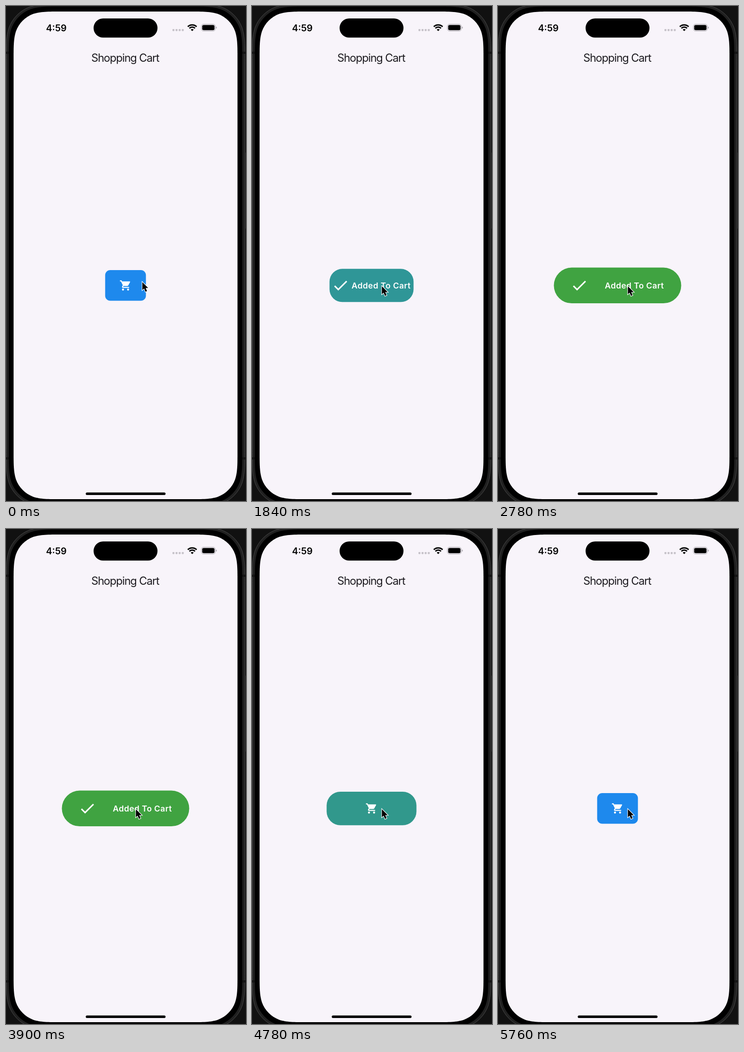
Recreate the animation shown at these times as an HTML page. Size 522x1074 px, loop 5.78 s.

```html
<!DOCTYPE html>
<html lang="en">
<head>
<meta charset="utf-8">
<title>Shopping Cart</title>
<style>
  html, body { margin: 0; width: 100%; height: 100%; overflow: hidden; background: #111; }
  svg { display: block; width: 522px; height: 1074px; }
  text { font-family: Inter, "Open Sans", sans-serif; font-optical-sizing: none; }
  .clock { font-size: 20px; font-weight: 600; }
  .title { font-size: 23.8px; letter-spacing: -1.1px; fill: #1d1b20; text-anchor: middle; }
  .added { font-size: 17.7px; font-weight: 600; letter-spacing: .45px; fill: #fff; }
  .warning { font-size: 8.3px; font-weight: 800; letter-spacing: .3px; fill: #7c0606; text-anchor: middle; }
</style>
</head>
<body>
<svg viewBox="0 0 522 1074">
  <defs>
    <linearGradient id="hazard" gradientUnits="userSpaceOnUse" x1="0" y1="0" x2="11" y2="11" spreadMethod="repeat">
      <stop offset=".25" stop-color="#000" stop-opacity=".75"/>
      <stop offset=".25" stop-color="#ff0" stop-opacity=".75"/>
      <stop offset=".75" stop-color="#ff0" stop-opacity=".75"/>
      <stop offset=".75" stop-color="#000" stop-opacity=".75"/>
    </linearGradient>
  </defs>

  <!-- phone -->
  <rect width="522" height="1074" fill="#111"/>
  <rect x="521" y="318" width="1" height="165" fill="#2e2e2e"/>
  <path id="frame" fill="#202020" stroke="#4a4a4a"/>
  <path d="M0 99h6v5H0zM514 99h6v5h-6zM0 979h6v5H0zM514 979h6v5h-6z" fill="#141414"/>
  <path id="bezel"/>
  <path id="screen" fill="#f8f4fa"/>

  <!-- status bar -->
  <text class="clock" x="87" y="54.5">4:59</text>
  <rect x="190.5" y="27" width="139" height="41.5" rx="20.7"/>
  <g id="dots" fill="#c6c2c9"></g>
  <path d="M395.4 44.9A13.6 13.6 0 0 1 414.6 44.9M398.9 48.4A8.6 8.6 0 0 1 411.1 48.4"
    fill="none" stroke="#000" stroke-width="3"/>
  <path d="M405 54.5l-3.2-3.2a4.5 4.5 0 0 1 6.4 0z"/>
  <rect x="424.9" y="39.4" width="30.4" height="15" rx="4.8" fill="none" stroke="#a5a2a8"/>
  <rect x="426.7" y="41.2" width="26.8" height="11.4" rx="3.3"/>
  <path d="M456.7 44.6q1.9.7 1.9 2.3t-1.9 2.3z" fill="#a5a2a8"/>

  <text class="title" x="259.2" y="120.5">Shopping Cart</text>
  <rect x="173.5" y="1055.5" width="173.5" height="5.6" rx="2.8"/>

  <!-- button -->
  <rect id="button"/>
  <path id="cart" fill="#fff" transform="translate(246.7 593) scale(1.108)"
    d="M7 18c-1.1 0-1.99.9-1.99 2S5.9 22 7 22s2-.9 2-2-.9-2-2-2zM1 2v2h2l3.6 7.59-1.35 2.45c-.16.28-.25.61-.25.96 0 1.1.9 2 2 2h12v-2H7.42c-.14 0-.25-.11-.25-.25l.03-.12.9-1.63h7.45c.75 0 1.41-.41 1.75-1.03l3.58-6.49c.08-.14.12-.31.12-.48 0-.55-.45-1-1-1H5.21l-.94-2H1zm16 16c-1.1 0-1.99.9-1.99 2s.89 2 1.99 2 2-.9 2-2-.9-2-2-2z"/>
  <g id="added">
    <path id="check" fill="#fff" d="M9 16.17 4.83 12l-1.42 1.41L9 19 21 7l-1.41-1.41z"/>
    <text id="label" class="added" y="612.7">Added To Cart</text>
  </g>
  <g id="overflow">
    <rect id="stripe" fill="url(#hazard)"/>
    <g id="warning">
      <rect x="-75.5" y="-8.3" width="151" height="10" fill="#fff"/>
      <text id="warningText" class="warning"></text>
    </g>
  </g>

  <path id="cursor" d="M0 0V17.3L3.9 13.9 6.8 21 10.2 19.6 7.3 12.7H12.6Z"
    stroke="#fff" stroke-width="2.2" paint-order="stroke"/>
</svg>
<script>
const LOOP = 5780;
const SCALE = 1.108;               // stage pixels per layout unit
const CENTER = { x: 260, y: 606.3 };
const ICON = 35, CONTENT = 152.7;  // layout units
const BLUE = [30, 137, 237], GREEN = [64, 163, 65];
const OPEN = 27, CLOSE = 90, LENGTH = 30;
const CURSOR = [[0, 296.5, 599], [6, 295.5, 604], [13, 292.5, 612], [16, 282.5, 608]];

const el = id => document.getElementById(id);
const set = (id, attrs) => {
  for (const name in attrs) el(id).setAttribute(name, attrs[name]);
};
const show = (id, on) => set(id, { visibility: on ? 'visible' : 'hidden' });
const mix = (a, b, p) => a + (b - a) * p;
const clamp = v => Math.min(1, Math.max(0, v));

// Rounded rectangle with continuous-curvature corners.
function smoothRect(x, y, w, h, r) {
  const curve = [[1.529, 0], [1.088, 0], [.868, 0], [.631, .075],
    [.373, .169], [.169, .373], [.075, .631], [0, .868], [0, 1.088], [0, 1.529]];
  const corner = (cx, cy, sx, sy, reverse) => {
    const pts = curve.map(([u, v]) => `${cx + sx * u * r} ${cy + sy * v * r}`);
    if (reverse) pts.reverse();
    return `${pts[0]}C${pts.slice(1)}`;
  };
  return 'M' + [
    corner(x, y, 1, 1, true),
    corner(x + w, y, -1, 1, false),
    corner(x + w, y + h, -1, -1, true),
    corner(x, y + h, 1, -1, false)
  ].join('L') + 'Z';
}

set('frame', { d: smoothRect(.5, -4, 519, 1090, 81) });
set('bezel', { d: smoothRect(6, 1, 508, 1080, 76) });
set('screen', { d: smoothRect(16.5, 12, 487, 1058, 68) });

el('dots').innerHTML = [0, 1, 2, 3].map(i =>
  `<rect x="${362 + i * 6.75}" y="50" width="4.4" height="4.4" rx="1.4"/>`).join('');

// Playback cadence: every three steps last 20, 100 and 20 ms.
function stepAt(t) {
  const rest = t % 140;
  return 3 * Math.floor(t / 140) + (rest < 20 ? 0 : rest < 120 ? 1 : 2);
}

function progressAt(step) {
  if (step >= CLOSE) return 1 - clamp((step - CLOSE) / LENGTH);
  if (step < OPEN) return 0;
  // The first step of the opening is followed by one dropped step.
  return clamp((step - OPEN + (step > OPEN ? 2 : 1)) / LENGTH);
}

function cursorAt(step) {
  const i = CURSOR.findIndex(k => k[0] > step);
  if (i < 0) return CURSOR[CURSOR.length - 1].slice(1);
  const [a, b] = [CURSOR[i - 1], CURSOR[i]];
  const p = (step - a[0]) / (b[0] - a[0]);
  return [mix(a[1], b[1], p), mix(a[2], b[2], p)];
}

const formatPixels = v =>
  v > 10 ? v.toFixed(0) : v > 1 ? v.toFixed(1) : v.toPrecision(3);

function draw(t) {
  const step = stepAt(t);
  const p = progressAt(step);
  const added = step >= OPEN && step < CLOSE;
  const units = mix(80, 250, p);
  const width = units * SCALE, height = mix(60, 70, p) * SCALE;
  const left = CENTER.x - width / 2, top = CENTER.y - height / 2;
  const right = left + width;

  set('button', {
    x: left, y: top, width, height,
    rx: Math.min(mix(10, 40, p) * SCALE, height / 2),
    fill: `rgb(${BLUE.map((c, i) => Math.round(mix(c, GREEN[i], p)))})`
  });
  show('cart', !added);
  show('added', added);

  const gap = Math.max(0, units - CONTENT) / 3 * SCALE;
  const icon = ICON * SCALE;
  set('check', {
    transform: `translate(${left + gap} ${CENTER.y - icon / 2}) scale(${icon / 24})`
  });
  set('label', { x: left + gap * 2 + icon });

  const excess = CONTENT - units;
  const overflowing = added && excess > 0;
  show('overflow', overflowing);
  if (overflowing) {
    set('stripe', { x: right - width / 10, y: top, width: width / 10, height });
    set('warning', { transform: `translate(${right - 1.1} ${CENTER.y}) rotate(-90)` });
    el('warningText').textContent = `RIGHT OVERFLOWED BY ${formatPixels(excess)} PIXELS`;
  }

  set('cursor', { transform: `translate(${cursorAt(step)})` });
}

const start = performance.now();
function tick() {
  draw((performance.now() - start) % LOOP);
  requestAnimationFrame(tick);
}
tick();
</script>
</body>
</html>
```
